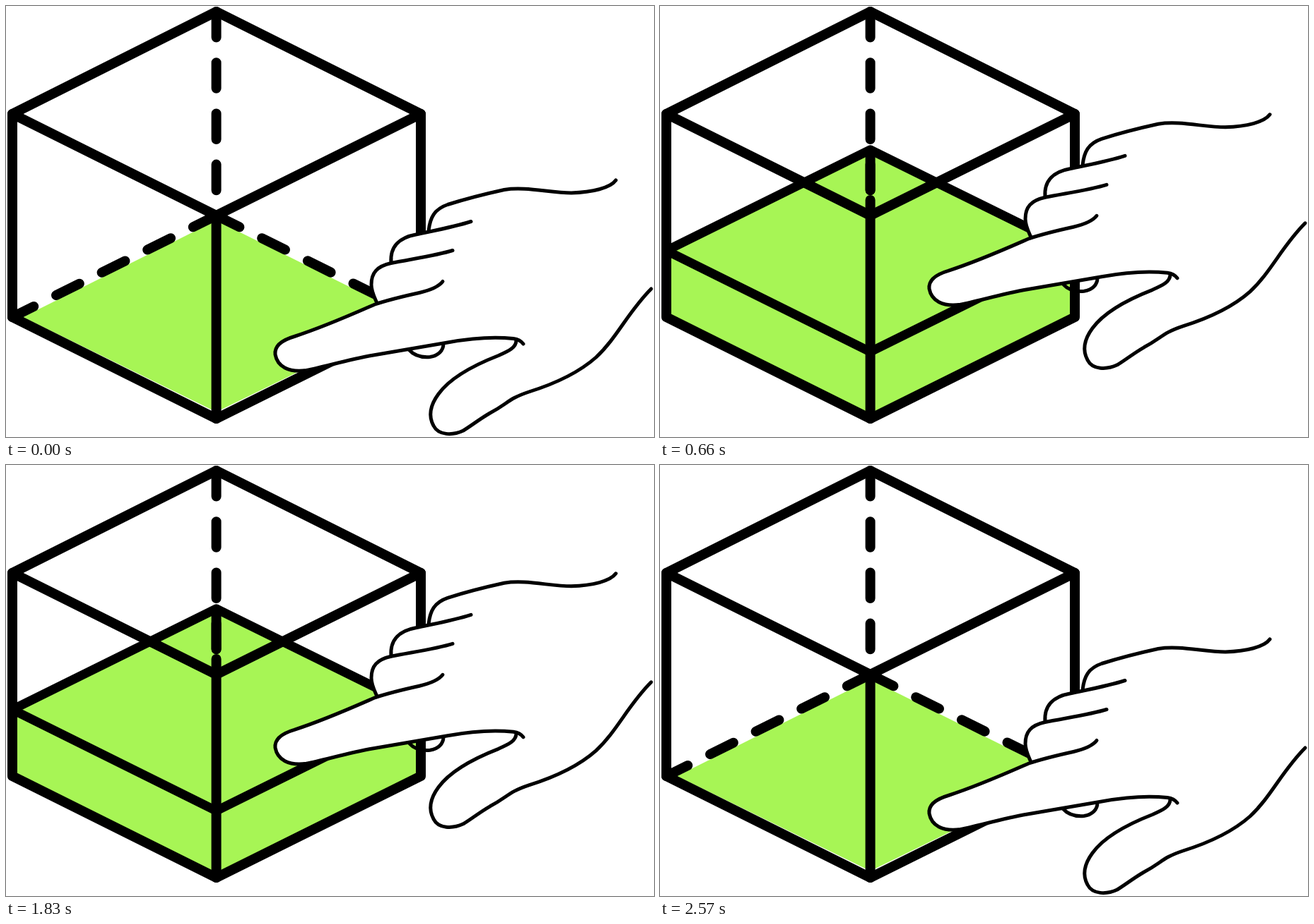
These frames come from a looping animation (917x611 px, 2.82 s). An HTML page with a canvas:

```html
<!DOCTYPE html>
<html lang="en">
<head>
<meta charset="utf-8">
<title>Filling a box</title>
<style>
  html, body { margin: 0; width: 100%; height: 100%; overflow: hidden; background: #fff; }
  canvas { display: block; width: 100%; height: 100%; }
</style>
</head>
<body>
<canvas id="stage" width="917" height="611"></canvas>
<script>
const ctx = document.getElementById('stage').getContext('2d');

const LOOP = 2820;
const STEP = 330;
const TOP_HOLD_END = 1830;
const RISE = 46.6;
const GREEN = '#a7f555';
const DASH = [36.6, 35.6];

const MID = 297.6;
const BACK = [MID, 8], LEFT = [9, 153], RIGHT = [587, 153], FRONT = [MID, 297];
const BASE_LEFT = [9, 441], BASE_FRONT = [MID, 585], BASE_RIGHT = [587, 441];
const BASE_BACK = [MID, 297];
const SURFACE = [BASE_BACK, [587, 440], [MID, 583.5], [9, 440]];

const lift = ([x, y], h) => [x, y - h];

const INDEX_FINGER = `C490 437 450 455 408 468.5 C386 475 380 484 381 494
  C384 511 400 520 425 516.5 C450 512 480 502 520 495 C560 488 595 482 625 477`;
const MIDDLE_FINGER = 'C525 369 517 378 517 395 C517 405 521 412 525 421';

const hand = {
  fill: new Path2D(`M598 319 L580 324 C558 328 543 340 545 364
    ${MIDDLE_FINGER} L522 423 ${INDEX_FINGER} L700 470 L700 290 Z`),
  lines: [
    'M598 319 C600 300 606 288 625 281.5 C655 272 680 266 705 260.5 C735 255.5 770 265 800 265 C830 264 855 258 863 247',
    'M658 305.5 C635 313 610 317.5 580 324 C558 328 543 340 545 364',
    `M632 346.5 C610 353.5 575 358.5 545 364.5 ${MIDDLE_FINGER}`,
    `M618 390.5 C613 397 600 403 585 406.5 C560 412 540 417 522 423 ${INDEX_FINGER}
     C660 470.5 690 468.5 718 471.5 C725 472.5 729 475 732 479`,
    `M722 474 C722 484 712 489 697 495.5 C665 508 630 525 612 550 C598 569 599 584 605 595
     C612 609 632 609 647 602 C660 594 668 587 685 577 C710 564 710 557 740 547
     C775 536 808 522 835 498 C865 470 880 434 913 401`
  ].map(d => new Path2D(d)),
  knuckle: new Path2D('M570 487 C577 495 588 498.5 600 497.5 C612 496 619 488 619 479')
};

function trace(points, closed) {
  ctx.beginPath();
  points.forEach(p => ctx.lineTo(...p));
  if (closed) ctx.closePath();
}

function line(points, { closed = false, dash = [] } = {}) {
  ctx.setLineDash(dash);
  trace(points, closed);
  ctx.stroke();
  ctx.setLineDash([]);
}

function fill(points) {
  trace(points, true);
  ctx.fill();
}

function drawLiquid(level, h) {
  ctx.fillStyle = GREEN;
  if (level === 0) {
    fill([[MID, 304], [24, 441], [MID, 575.5], [572, 441]]);
    line([BASE_BACK, BASE_LEFT], { dash: DASH });
    line([BASE_BACK, BASE_RIGHT], { dash: DASH });
    return;
  }
  const surface = SURFACE.map(p => lift(p, h));
  fill([surface[0], surface[1], BASE_RIGHT, BASE_FRONT, BASE_LEFT, surface[3]]);
  ctx.lineWidth = 13;
  line(surface, { closed: true });
  ctx.lineWidth = 14;
}

function drawBox(level) {
  line([BACK, [MID, 262]], { dash: DASH });
  if (level === 1) line([[MID, 225], FRONT]);
  if (level === 2) {
    line([[MID, 205], [MID, 261]]);
    line([[MID, 275], FRONT]);
  }
  line([BACK, RIGHT, FRONT, LEFT], { closed: true });
  line([LEFT, BASE_LEFT, BASE_FRONT, BASE_RIGHT, RIGHT]);
  line([FRONT, BASE_FRONT]);
}

function drawHand(h) {
  ctx.save();
  ctx.translate(0, -h);
  ctx.lineWidth = 5;
  ctx.stroke(hand.knuckle);
  ctx.fillStyle = '#fff';
  ctx.fill(hand.fill);
  hand.lines.forEach(path => ctx.stroke(path));
  ctx.restore();
}

// The level climbs in hard steps, rests at the top, then steps back down.
function levelAt(t) {
  if (t < TOP_HOLD_END) return Math.min(3, Math.floor(t / STEP));
  return Math.max(0, 2 - Math.floor((t - TOP_HOLD_END) / STEP));
}

function draw(t) {
  const level = levelAt(t);
  const h = level * RISE;
  ctx.fillStyle = '#fff';
  ctx.fillRect(0, 0, 917, 611);
  ctx.strokeStyle = '#000';
  ctx.lineWidth = 14;
  ctx.lineCap = ctx.lineJoin = 'round';
  drawLiquid(level, h);
  drawBox(level);
  drawHand(h);
}

const start = performance.now();
function tick() {
  draw((performance.now() - start) % LOOP);
  requestAnimationFrame(tick);
}
tick();
</script>
</body>
</html>
```
